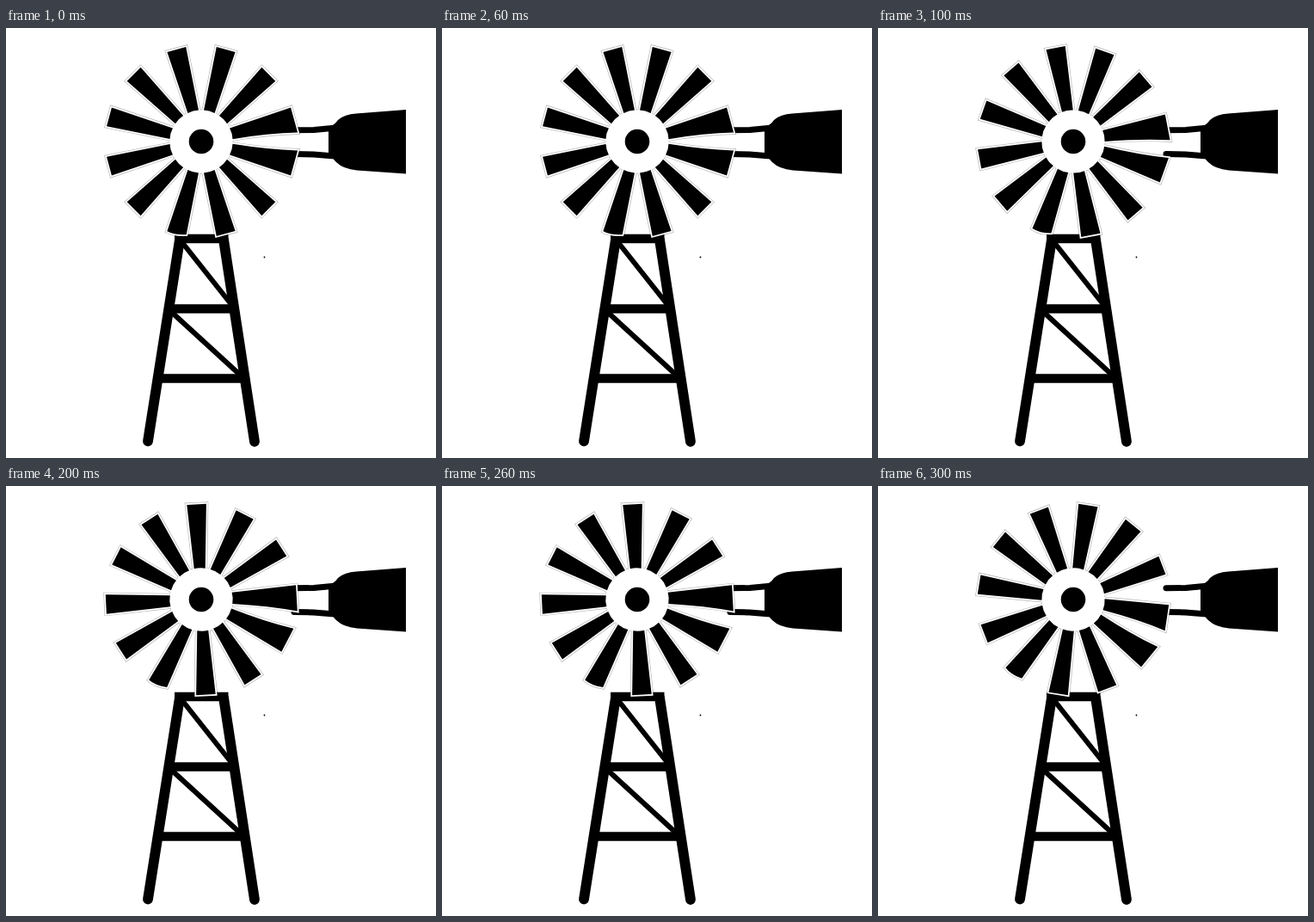
Recreate the animation shown at these times as an HTML page. Size 500 by 500 pixels, loop 0.4 s.

```html
<!DOCTYPE html>
<html lang="en">
<head>
<meta charset="utf-8">
<title>Windmill</title>
<style>
  html, body { margin: 0; width: 100%; height: 100%; overflow: hidden; background: #fff; }
  svg { display: block; width: 100%; height: 100%; }
  .line { fill: none; stroke: #000; }
  .outline { fill: #fff; stroke: #b4b4b4; stroke-width: 4.8; }
  .halo { fill: #fff; stroke: #fff; stroke-width: 3.5; }
</style>
</head>
<body>
<svg viewBox="0 0 500 500">
  <defs>
    <g id="blades"></g>
    <g id="silhouette"><use href="#blades"/><circle r="35"/></g>
  </defs>

  <use class="wheel outline" href="#silhouette"/>

  <g class="line" stroke-width="11.8" stroke-linecap="round">
    <path d="M202 246L165 480.500M253 246L289 481"/>
    <g stroke-linecap="butt" stroke-width="10.5">
      <path d="M196 245H258.500M190 326.500H265M178 407.500H277"/>
      <path stroke-width="6" d="M203 247L264 324M191 329L274 405"/>
    </g>
    <path stroke-width="7" d="M335 118.700L358 118.500L379 116.500M335 146.500Q358 146.500 379 148.800"/>
  </g>
  <path d="M465 95L407 99.500Q394 100 386 107Q382 113 375 115V149Q380 151 384 156Q392 164 408 165.500L465 169.500Z"/>
  <circle cx="300.500" cy="266.500" r=".9"/>

  <use class="wheel halo" href="#silhouette"/>
  <use class="wheel" href="#blades"/>
  <circle cx="227" cy="132" r="14.300"/>
</svg>
<script>
const STEP_MS = 100;
const ANGLES = [0, 4.4, 12.2, 24];
const BLADE_COUNT = 12;

const narrow = 'M-6.500 -36L-11.300 -110.800H11.300L6.500 -36Q0 -37.500 -6.500 -36Z';
const wide = 'M-6.500 -36L-11.300 -110.800L19 -111Q11 -78 6.700 -36Q0 -37.500 -6.500 -36Z';
const rounded = 'M-6.500 -36L-11.300 -109Q2 -113.500 11.300 -111L6.500 -36Q0 -37.500 -6.500 -36Z';

// The two blades beside the tail flare towards each other.
function bladeMarkup(index) {
  const angle = 15 + index * 360 / BLADE_COUNT;
  const shape = angle === 75 || angle === 105 ? wide : angle === 195 ? rounded : narrow;
  const mirror = angle === 105 ? ' scale(-1 1)' : '';
  return `<path d="${shape}" transform="rotate(${angle})${mirror}"/>`;
}

document.getElementById('blades').innerHTML =
  Array.from({ length: BLADE_COUNT }, (_, i) => bladeMarkup(i)).join('');

const wheels = document.querySelectorAll('.wheel');
const start = performance.now();

function draw() {
  const step = Math.floor(Math.max(0, performance.now() - start) / STEP_MS) % ANGLES.length;
  for (const wheel of wheels) {
    wheel.setAttribute('transform', `translate(227 132) rotate(${ANGLES[step]})`);
  }
  requestAnimationFrame(draw);
}
draw();
</script>
</body>
</html>
```
